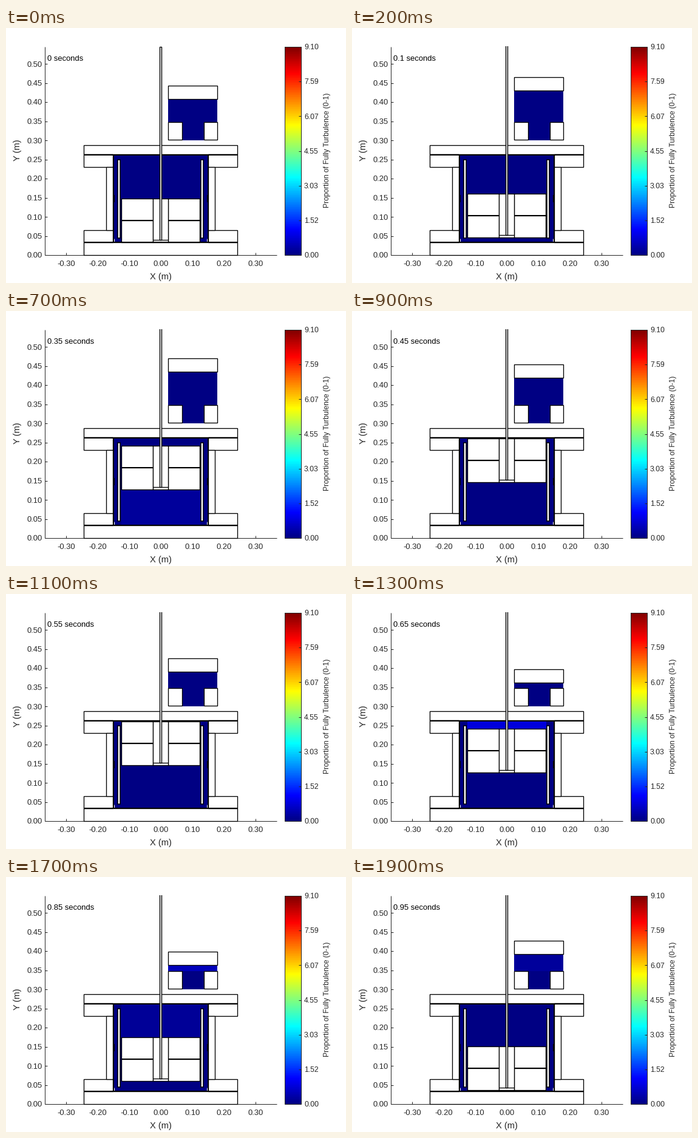
A matplotlib script that plays this animation: 560 by 420 pixels, repeating every 2 s.

```python
import numpy as np
import matplotlib.pyplot as plt
from matplotlib.animation import FuncAnimation
from matplotlib.patches import Rectangle

W, H, DPI = 560, 420, 100
PX = 72 / DPI
FRAMES, INTERVAL = 20, 100
INK = (0.15, 0.15, 0.15)
VMAX, LEVELS = 9.104, 256

plt.rcParams["font.family"] = "Liberation Sans"
fig = plt.figure(figsize=(W / DPI, H / DPI), dpi=DPI, facecolor="white")
ax = fig.add_axes([0, 0, 1, 1])
ax.set_xlim(0, W)
ax.set_ylim(H, 0)
ax.axis("off")


def jet(level):
    """Colour of one level of the map, counted from 0."""
    pos = (level + 1) * 4 / LEVELS
    return tuple(np.clip(1.5 - abs(pos - c), 0, 1) for c in (3, 2, 1))


def shade(value):
    return jet(int(np.clip(value / VMAX * LEVELS, 0, LEVELS - 1)))


def box(x0, y0, x1, y1, fill="white", edge="black", lw=1.33, z=3):
    patch = Rectangle((x0, y0), x1 - x0, y1 - y0, facecolor=fill,
                      edgecolor=edge, linewidth=lw * PX, zorder=z)
    return ax.add_patch(patch)


def gas(x0, y0, x1, y1, z=2):
    return box(x0, y0, x1, y1, fill=shade(0), edge="none", lw=0, z=z)


def line(x0, y0, x1, y1, color="black", lw=1.33, z=4):
    return ax.plot([x0, x1], [y0, y1], color=color, lw=lw * PX, zorder=z,
                   solid_capstyle="butt")[0]


def text(x, y, s, size, ha="left", va="baseline", rot=0, color=INK):
    return ax.text(x, y, s, fontsize=size * PX, ha=ha, va=va, rotation=rot,
                   color=color, zorder=9)


def set_rows(patch, y0, y1):
    patch.set_y(y0)
    patch.set_height(max(y1 - y0, 0))


def draw_axes():
    line(64, 31, 64, 374, INK, 1, 1)
    line(64, 374, 446, 374, INK, 1, 1)
    for k in range(11):
        y = 374 - 31.5 * k
        line(64, y, 68, y, INK, 1, 1)
        text(59.5, y + 4.5, f"{0.05 * k:.2f}", 13, "right")
    for k in range(-3, 4):
        x = 255 + 52 * k
        line(x, 374, x, 370, INK, 1, 1)
        text(x, 392.5, f"{0.1 * k:.2f}", 13, "center")
    text(254.5, 414, "X (m)", 14.67, "center")
    text(19, 201.5, "Y (m)", 14.67, "center", "center", 90)


def draw_colorbar():
    ramp = np.array([[jet(k)] for k in range(LEVELS)])
    ax.imshow(ramp, extent=(459, 486, 374, 31), origin="lower",
              aspect="auto", interpolation="nearest", zorder=2)
    ax.set_xlim(0, W)
    ax.set_ylim(H, 0)
    box(459, 31, 486, 374, "none", INK, 1, 3)
    for k in range(7):
        y = 374 - 343 * k / 6
        line(482, y, 486, y, INK, 1)
        text(491, y + 4.3, f"{VMAX * k / 6:.2f}", 12.3)
    text(529, 201.5, "Proportion of Fully Turbulence (0-1)", 12.05,
         "center", "center", 90)


def draw_housing():
    box(128, 193, 381, 208)
    box(128, 353, 381, 374)
    for x0, x1, wall0, wall1 in ((128, 176, 165, 176), (333, 381, 333, 344)):
        box(x0, 208, x1, 229)
        box(x0, 333, x1, 353)
        box(wall0, 229, wall1, 333)
    gas(176, 208, 334, 353)
    for x in (177, 333):
        line(x, 208, x, 353, lw=1.8)
    for y in (208.5, 353):
        line(128, y, 381, y, lw=2, z=7)
    for x in (184, 321):
        box(x, 217, x + 4, 346, lw=1.5, z=6)
    for x in (178, 331):
        line(x, 347, x, 352, "white", 1)
    for x in (178, 332):
        line(x, 275, x, 287, lw=2)


draw_axes()
draw_colorbar()
draw_housing()

# lower cylinder
SIDES = ((190, 242), (267, 319))
upper_gas = gas(190, 209, 320, 281)
lower_gas = gas(190, 350, 320, 353)
halves = [(box(x0, 0, x1, 1, z=4), box(x0, 0, x1, 1, z=4))
          for x0, x1 in SIDES]
mids = [line(x0, 0, x1, 0, lw=2, z=5) for x0, x1 in SIDES]
hub = box(242, 0, 267, 1, z=4)
hub_line = line(242, 0, 267, 0, z=5)
rod = box(253, 0, 256, 1, lw=1.4, z=8)
rod.set_clip_path(Rectangle((64, 30), 382, 344, transform=ax.transData))

# upper right cylinder
side_gas = gas(267, 117, 348, 155)
gas(290, 155, 326, 185)
box(267, 155, 290, 184)
box(326, 155, 348, 184)
side_piston = box(267, 95, 348, 117, z=5)

clock = text(68, 54, "", 13, color="black")

# turbulence key points: times, values
UPPER = ([.45, .5, .55, .6, .65, .7, .75, .85, .95],
         [0, 2, 2.6, 1.4, .8, .5, .38, .2, 0])
LOWER = ([0, .1, .15, .2, .25, .3, .35, .45, .85, .9, .95],
         [0, 0, .15, .35, .38, .3, .22, 0, 0, .4, 1.3])
SIDE = ([.75, .8, .85, .9, .95, 1], [0, .9, .5, .35, .22, 0])


def update(i):
    t = i / FRAMES
    c, s = np.cos(2 * np.pi * t), np.sin(2 * np.pi * t)

    top = 245 + 36 * c - 3.5 * s * s
    mid, bottom, seat = top + 36, top + 72, top + 68
    set_rows(upper_gas, 208, top)
    set_rows(lower_gas, bottom, 353)
    for (a, b), m in zip(halves, mids):
        set_rows(a, top, mid)
        set_rows(b, mid, bottom)
        m.set_ydata([mid, mid])
    set_rows(hub, top, bottom)
    hub_line.set_ydata([seat, seat])
    set_rows(rod, seat - 318.5, seat)

    head = 103.5 - 28.5 * s - 8 * c * c - 0.5 * c
    set_rows(side_piston, head, head + 22)
    set_rows(side_gas, head + 22, 155)

    for patch, keys in ((upper_gas, UPPER), (lower_gas, LOWER),
                        (side_gas, SIDE)):
        patch.set_facecolor(shade(np.interp(t, *keys)))
    clock.set_text(f"{t:g} seconds")
    return []


anim = FuncAnimation(fig, update, frames=FRAMES, interval=INTERVAL,
                     repeat=True, repeat_delay=0, init_func=lambda: update(0))
plt.show()
```
